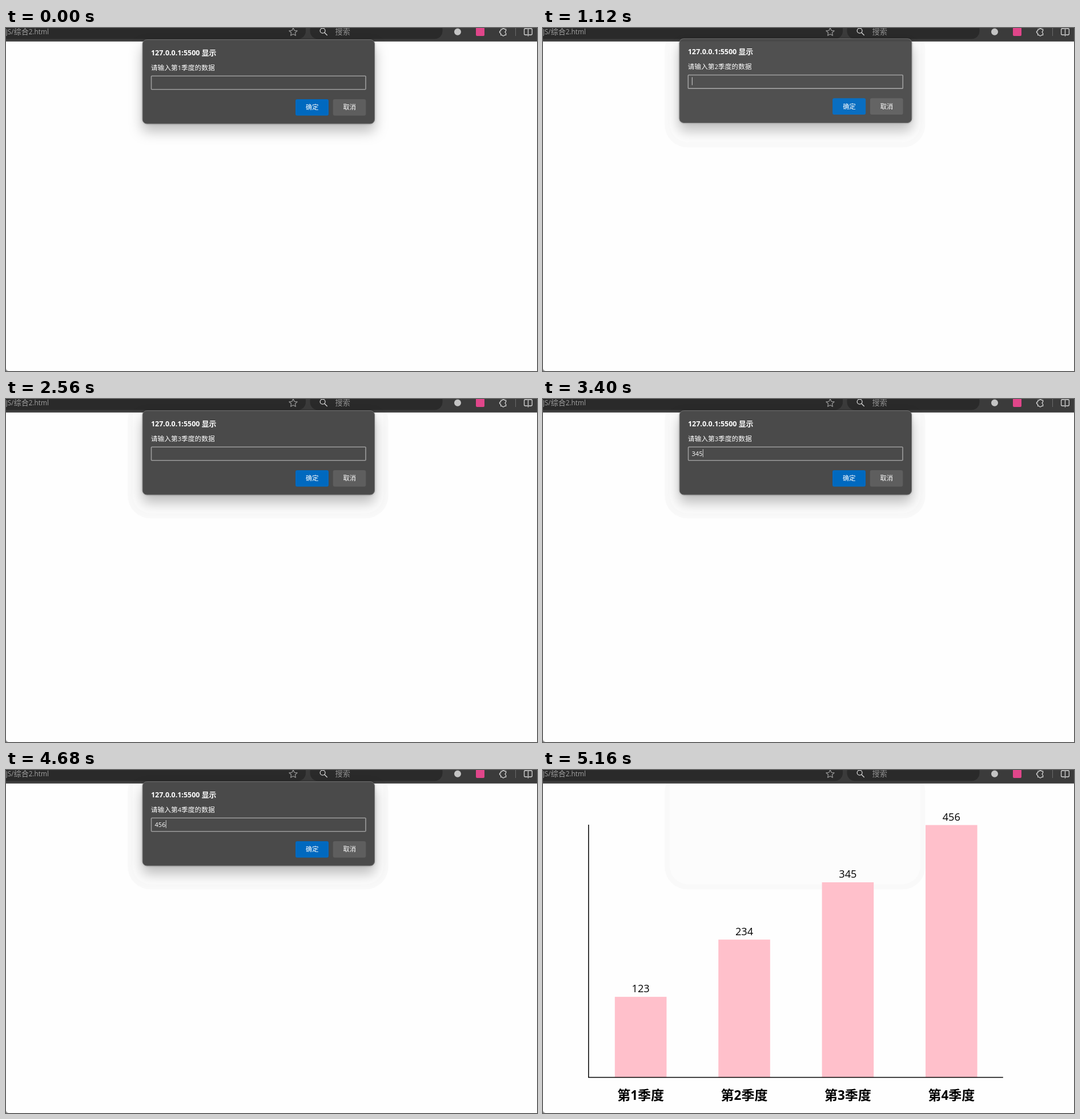
Write an HTML page that moves like this. It is 930x602 px and loops after 6.8 s.

```html
<!DOCTYPE html>
<html lang="zh">
<head>
<meta charset="utf-8">
<title>季度数据</title>
<style>
  html, body { margin: 0; width: 100%; height: 100%; overflow: hidden; background: #fefefe; }
  svg { display: block; }
  text { font-family: "Open Sans", "Noto Sans CJK SC", "Noto Sans CJK", sans-serif; white-space: pre; }
  .icon { fill: none; stroke: #d6d6d6; stroke-width: 1.3; stroke-linejoin: round; stroke-linecap: round; }
  .panel {
    fill: #4a4a4a; stroke: #707070;
    filter: drop-shadow(0 0 2px rgba(0,0,0,.2)) drop-shadow(0 13px 11px rgba(0,0,0,.25));
  }
</style>
</head>
<body>
<svg width="930" height="602" viewBox="0 0 930 602">
  <g id="page"></g>
  <path d="M0 597.5Q.5 601.5 4.5 602H0Z" fill="#8a8a8a"/>
  <g id="toolbar">
    <rect width="930" height="23.7" fill="#3b3b3b"/>
    <rect x="-30" y="-12" width="555" height="31.3" rx="14" fill="#2a2a2a"/>
    <rect x="532.5" y="-12" width="232" height="31.3" rx="14" fill="#2a2a2a"/>
    <path id="star" class="icon" style="stroke:#939393"/>
    <g class="icon">
      <circle cx="554.6" cy="4.8" r="4.4"/>
      <path d="M558 8.2L562.3 12.5"/>
      <path d="M867 2.2H869.2A2.1 2.1 0 0 1 873.2 2.2H875.6V5.2A2 2 0 0 0 875.6 9V12.4H873A2.1 2.1 0 0 1 869 12.4H866.6V9.2A2.1 2.1 0 0 1 866.6 5Z"/>
      <path d="M913 1H909.5Q907.6 1 907.6 3V10Q907.6 12 909.5 12H913M916 1H919.5Q921.4 1 921.4 3V10Q921.4 12 919.5 12H916M914.5 -1V14"/>
    </g>
    <circle cx="791" cy="6.8" r="6" fill="#c4c4c4"/>
    <rect x="823" y="-1" width="15" height="15" rx="2" fill="#e0468a"/>
    <rect x="892" y="0" width="1" height="14" fill="#6a6a6a"/>
  </g>
  <g id="dialogs"></g>
</svg>
<script>
const LOOP = 6800, TICK = 40, CHART_AT = 5080, RESIDUE_AT = 1000;

// keys: typing times; hidden: interval without a caret; close: moment of the handover
const quarters = [
  { value: '123', keys: [320, 480, 680], hidden: [0, 280], close: 1020 },
  { value: '234', keys: [1320, 1520, 1720], hidden: [0, 0], close: 2120 },
  { value: '345', keys: [2920, 3160, 3400], hidden: [2560, 2920], close: 3640 },
  { value: '456', keys: [4320, 4480, 4680], hidden: [4080, 4320], close: 5040 }
];

const byId = id => document.getElementById(id);
const clamp = v => Math.max(0, Math.min(1, v));

const rect = (x, y, w, h, fill, extra = '') =>
  `<rect x="${x}" y="${y}" width="${w}" height="${h}" fill="${fill}" ${extra}/>`;

// Latin runs are set a little smaller than the Chinese characters around them.
function label(str, x, y, size, { fill = '#fff', weight = 400, anchor = 'start', latin = weight > 400 ? .975 : .94 } = {}) {
  const runs = str.replace(/[\x20-\x7e]+/g, run => `<tspan font-size="${size * latin}">${run}</tspan>`);
  return `<text x="${x}" y="${y}" font-size="${size}" font-weight="${weight}" fill="${fill}" text-anchor="${anchor}">${runs}</text>`;
}

function dialog(index, typed, caret, offset, alpha) {
  const scale = 1 + .0008 * Math.abs(offset);
  return `<g opacity="${alpha}" transform="translate(442.2 ${94.3 + offset}) scale(${scale}) translate(-442.2 -94.3)">
    <rect class="panel" x="239.2" y="20.5" width="406.3" height="147.5" rx="7.5"/>
    ${label('127.0.0.1:5500 显示', 254, 47.5, 12.8, { weight: 700 })}
    ${label(`请输入第${index + 1}季度的数据`, 253.7, 73.5, 11.75)}
    ${rect(254.5, 84.2, 375.5, 23.6, '#4a4a4a', 'rx="1" stroke="#9c9c9c" stroke-width="1.6"')}
    ${label(typed, 260.6, 99.5, 11.7)}
    ${caret ? rect(261 + 6.25 * typed.length, 88, 1, 14, '#d0d0d0') : ''}
    ${rect(507, 125, 58, 28.7, '#0069bf', 'rx="3"')}
    ${rect(572.7, 125, 57.6, 28.7, '#5e5e5e', 'rx="3"')}
    ${label('确定', 536.3, 143.2, 11.2, { anchor: 'middle' })}
    ${label('取消', 601.7, 143.2, 11.2, { anchor: 'middle' })}
  </g>`;
}

function dialogs(t) {
  return quarters.map(({ value, keys, hidden, close }, i) => {
    const opening = i ? t - quarters[i - 1].close : LOOP;
    const closing = t - close;
    if (opening < 0) return '';
    const typed = value.slice(0, keys.filter(k => t >= k).length);
    if (closing >= -20) {
      const alpha = clamp(.93 - .0105 * closing);
      return alpha ? dialog(i, typed, false, -6.2 - .08 * closing, alpha) : '';
    }
    const rest = 1 - clamp(opening / 120);
    const caret = t < hidden[0] || t >= hidden[1];
    return dialog(i, typed, caret, -12 * rest ** 1.1, 1 - .8 * rest ** 1.7);
  }).join('');
}

function chart() {
  const base = 539.3;
  const bars = quarters.map(({ value }, i) => {
    const x = 125.8 + 181.4 * i, middle = x + 45.3, height = 29.8 + .9055 * value;
    const style = { fill: '#000', anchor: 'middle' };
    return rect(x, base - height, 90.6, height, '#ffc0cb')
      + label(value, middle, base - height - 8, 19.3, style)
      + label(`第${i + 1}季度`, middle, 578.7, 23, { ...style, weight: 700 });
  }).join('');
  return bars + '<path d="M79.8 96V539.5H805.8" fill="none" stroke="#000" stroke-width="1.5"/>';
}

function page(t) {
  const residue = t >= RESIDUE_AT
    ? rect(213, -2, 456.5, 211.5, '#f9f9f9', 'rx="40"') + rect(222, -2, 439, 202.5, '#fcfcfc', 'rx="32"')
    : '';
  return residue + (t >= CHART_AT ? chart() : '');
}

const starPoints = Array.from({ length: 10 }, (_, i) => {
  const r = i % 2 ? 3.6 : 7.4, a = i * Math.PI / 5;
  return `${503 + r * Math.sin(a)} ${7.2 - r * Math.cos(a)}`;
});
byId('star').setAttribute('d', `M${starPoints.join('L')}Z`);
byId('toolbar').insertAdjacentHTML('beforeend',
  label('JS/综合2.html', 75, 11.2, 13, { fill: '#a2a2a2', anchor: 'end', latin: .91 })
  + label('搜索', 576.5, 11.2, 13.2, { fill: '#929292' }));

let shown = -1;
function frame() {
  const t = Math.floor(performance.now() % LOOP / TICK) * TICK;
  if (t !== shown) {
    byId('page').innerHTML = page(t);
    byId('dialogs').innerHTML = dialogs(t);
    shown = t;
  }
  requestAnimationFrame(frame);
}
frame();
</script>
</body>
</html>
```
